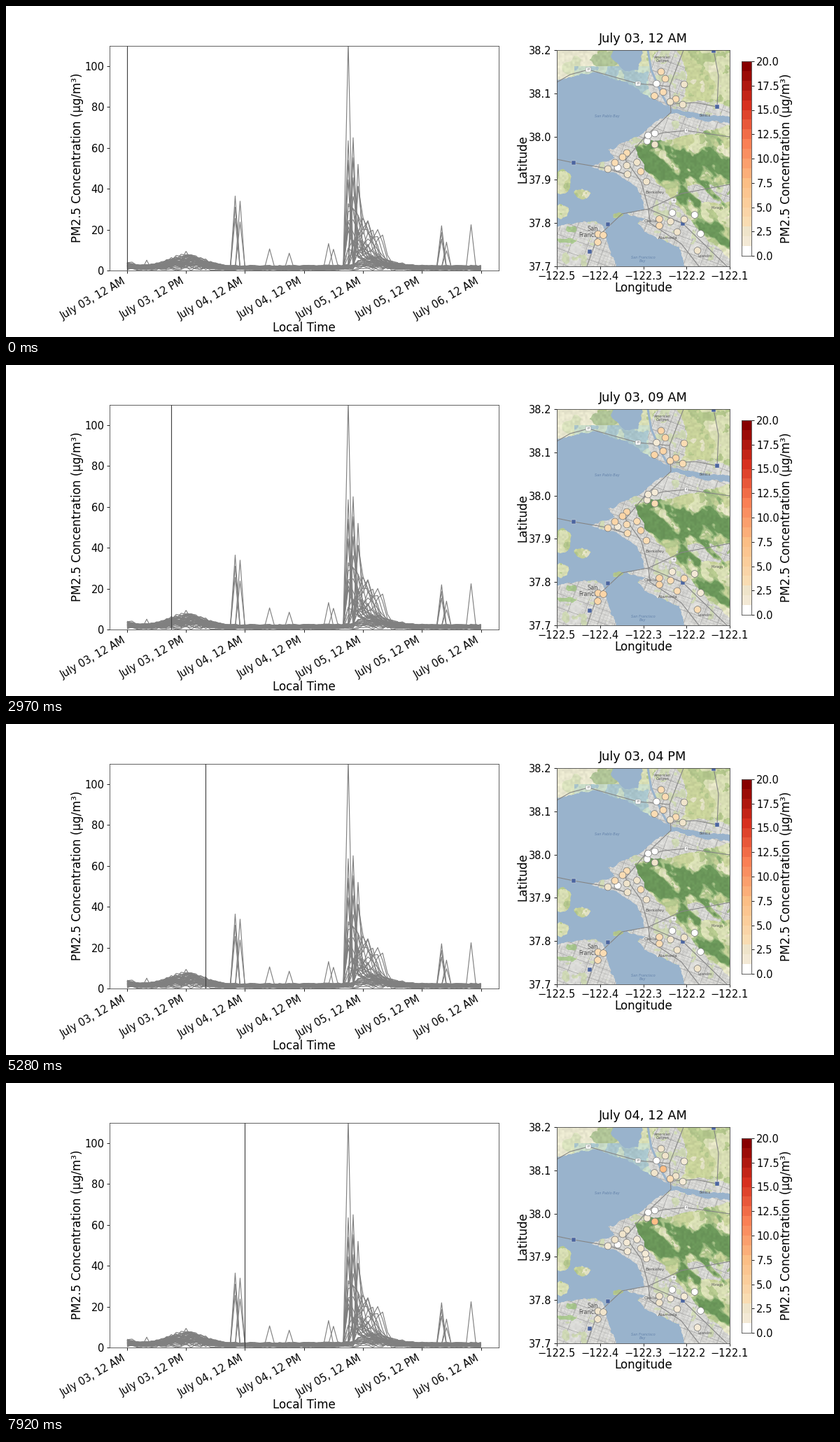
A matplotlib script that plays this animation: 1183 px wide and 473 px high, repeating every 8000 ms.

```python
import numpy as np
import matplotlib.pyplot as plt
from matplotlib.animation import FuncAnimation
from matplotlib.collections import LineCollection
from matplotlib.colors import LinearSegmentedColormap, to_rgb
from matplotlib.path import Path

W, H, DPI = 1183, 473, 64
PT = 72 / DPI                      # points per pixel
STEP, TICK, LOOP = 330, 40, 8000   # ms per hour, per drawn frame, per loop
TICK_SIZE, LABEL_SIZE, TITLE_SIZE = 14.6, 16.7, 17.8
UNIT = "PM2.5 Concentration (µg/m³)"

plt.rcParams.update({"font.family": "DejaVu Sans", "axes.linewidth": 0.85 * PT,
                     "axes.edgecolor": "#4a4a4a"})
fig = plt.figure(figsize=(W / DPI, H / DPI), dpi=DPI, facecolor="white")


def axes_px(x0, y0, x1, y1):
    ax = fig.add_axes([x0 / W, 1 - y1 / H, (x1 - x0) / W, (y1 - y0) / H])
    ax.tick_params(length=3.7 * PT, width=0.85 * PT, pad=3.6 * PT,
                   labelsize=TICK_SIZE * PT)
    return ax


def label(x, y, text, size=LABEL_SIZE, rotation=0):
    return fig.text(x / W, 1 - y / H, text, size=size * PT, rotation=rotation,
                    ha="center", va="center")


def clock(h):
    return f"July {3 + h // 24:02d}, {(h - 1) % 12 + 1:02d} {'PM' if h % 24 > 11 else 'AM'}"


# ---------- time series ----------
hours = np.arange(73)
# hour, height, number of lines that spike together
PEAKS = [(4, 5.2, 1), (12, 9.5, 2), (22, 36.5, 3), (23, 34, 2), (29, 10.7, 1),
         (33, 8.6, 1), (41, 13.3, 1), (42, 10.5, 1), (45, 112, 1), (45, 63.5, 3),
         (46, 65, 3), (47, 52, 1), (64, 22, 3), (65, 14, 2), (70, 22.5, 1)]


def bell(x, mid, width):
    return np.exp(-((x - mid) / width) ** 2)


def make_series(count=44):
    rng = np.random.default_rng(11)
    swell = 2.4 + 5.2 * bell(hours, 12, 5) + 1.7 * bell(hours, 0, 2) + 2.5 * bell(hours, 51, 5)
    fire = np.where(hours < 45, 0, np.exp(-((hours - 45) / 3.2) ** 1.6))
    lines = []
    for k in np.linspace(0, 1, count):
        y = swell * (0.72 * rng.random() + 0.45 * rng.random(73))
        gust = np.roll(fire, rng.integers(0, 3)) * rng.uniform(0.3, 1, 73)
        lines.append(y + 46 * k ** 2 * gust)
    for n, y in enumerate(lines[-6:]):
        late = rng.uniform(18, 29) * bell(hours, 49 + 0.5 * n, 1.7)
        np.maximum(y, late * rng.uniform(0.8, 1, 73), out=y)
    spare = iter(lines)
    for hour, height, lift in PEAKS:
        for share in np.linspace(1, 0.7, lift):
            next(spare)[hour] = height * share
    return lines


left = axes_px(147.7, 56.5, 703.8, 378.4)
left.set(xlim=(-3.6, 75.6), ylim=(0, 110), xticks=range(0, 73, 12),
         yticks=range(0, 101, 20))
left.set_xticklabels([clock(h) for h in range(0, 73, 12)], rotation=30, ha="right")
left.add_collection(LineCollection([np.column_stack([hours, y]) for y in make_series()],
                                   colors="#808080", linewidths=1.15 * PT))
cursor = left.axvline(0, color="#404040", lw=1.15 * PT, zorder=3)
label(426, 460, "Local Time")
label(102, 217, UNIT, rotation=90)

# ---------- terrain map, in stage pixels ----------
X0, Y0, X1, Y1 = 787, 63, 1034, 372
SS = 2
gx, gy = np.meshgrid(np.arange(X0, X1, 1 / SS) + 0.25, np.arange(Y0, Y1, 1 / SS) + 0.25)
dx, dy = gx - X0, gy - Y0


def noise(cell, seed, u=dx, v=dy):
    grid = np.random.default_rng(seed).random((128, 128))
    u, v = u / cell, v / cell
    i, j = np.floor(u).astype(int), np.floor(v).astype(int)
    fu, fv = u - i, v - j
    fu, fv = fu * fu * (3 - 2 * fu), fv * fv * (3 - 2 * fv)

    def row(j):
        return grid[j % 128, i % 128] * (1 - fu) + grid[j % 128, (i + 1) % 128] * fu

    return row(j) * (1 - fv) + row(j + 1) * fv


def fractal(cell, seed, *uv):
    return sum(noise(cell / 2 ** k, seed + k, *uv) / 2 ** k for k in range(3)) / 1.75


wx, wy = gx + 7 * (fractal(9, 1) - 0.5), gy + 7 * (fractal(9, 5) - 0.5)
warped = np.column_stack([wx.ravel(), wy.ravel()])


def area(poly):
    return Path(poly).contains_points(warped).reshape(gx.shape)


def blob(x, y, rx, ry):
    return ((wx - x) / rx) ** 2 + ((wy - y) / ry) ** 2 < 1


NORTH = [(770, 50), (866, 50), (866, 76), (884, 93), (902, 92), (914, 50), (1050, 50),
         (1050, 160), (990, 155), (950, 146), (922, 131), (888, 111), (845, 95),
         (822, 98), (770, 112)]
EAST = [(1050, 170), (990, 163), (952, 152), (918, 173), (903, 186), (861, 206),
        (868, 216), (836, 231), (874, 240), (903, 260), (913, 290), (882, 297),
        (912, 302), (902, 309), (914, 322), (962, 345), (974, 390), (1050, 390)]
CITY_WEST = [(770, 316), (843, 306), (855, 314), (862, 348), (878, 390), (770, 390)]


def paint_map():
    img = np.empty(gx.shape + (3,))
    img[:] = to_rgb("#99b3cc")

    def fill(mask, color):
        img[mask] = to_rgb(color)

    north, east, west = area(NORTH), area(EAST), area(CITY_WEST)
    isles = (blob(795, 252, 12, 18) | blob(823, 269, 11, 7) | blob(793, 293, 10, 10)
             | blob(875, 300, 6, 4))
    land = north | east | west | isles
    rough, fine = fractal(26, 20), fractal(13, 30)
    ridge = fractal(12, 40, (dx + dy) * 0.4, (dy - dx) * 0.7)
    fill(land, "#d8deb4")
    fill(land & (rough > 0.55), "#c9d39b")
    fill(land & (fine > 0.62), "#b4c78d")
    fill(land & (fine < 0.33), "#e5e4c6")

    flats = north & (gx < 845)
    fill(flats, "#e9e7cf")
    fill(flats & (rough > 0.56), "#d9e1bd")
    fill(north & blob(856, 76, 20, 12), "#b0c497")
    marsh = north & (gx < 932) & (gx > 812) & (gy > 86)
    fill(marsh, "#c9dcc8")
    fill(marsh & (fine > 0.52), "#a9c5cc")

    hill_x = np.interp(wy, [165, 188, 198, 230, 275, 330, 368], [1060, 960, 896, 912, 950, 1000, 1040])
    hills = east & (wx > hill_x)
    towns = (east & ~hills) | west | (land & (
        blob(945, 105, 27, 48) | blob(990, 150, 50, 14) | blob(1005, 268, 48, 14)))
    fill(towns, "#dadad7")
    a, b = gx * 0.94 + gy * 0.34, gy * 0.94 - gx * 0.34
    fill(towns & ((a % 5 < 0.8) | (b % 4 < 0.7)) & (rough > 0.36), "#c6c6c4")
    fill(towns & ((a % 23 < 0.9) | (b % 19 < 0.9)), "#acacab")
    fill(towns & (fine > 0.7), "#cdd7b4")

    # woods follow two ridges running down to the right
    woods = ridge + 0.26 * np.maximum(bell(gy, 226 + 0.2 * (gx - 960), 32),
                                      bell(gy, 285 + 0.75 * (gx - 960), 17))
    fill(hills & (woods > 0.64), "#a6c086")
    fill(hills & (woods > 0.70), "#86ab70")
    fill(hills & (woods > 0.74), "#6b975a")
    fill(west & (blob(800, 335, 15, 3) | blob(808, 318, 7, 4)), "#a9c78f")
    img[land] *= (0.95 + 0.1 * noise(3, 50))[land][:, None]
    h, w = gx.shape
    return np.clip(img, 0, 1).reshape(h // SS, SS, w // SS, SS, 3).mean((1, 3))


chart = axes_px(X0, Y0, X1, Y1)
chart.imshow(paint_map(), extent=(X0, X1, Y1, Y0), interpolation="nearest", aspect="auto")
chart.set(xlim=(X0, X1), ylim=(Y1, Y0))
chart.set_xticks(np.linspace(X0, X1, 5), [f"−{122.5 - k / 10:.1f}" for k in range(5)])
chart.set_yticks(np.linspace(Y1, Y0, 6), [f"{37.7 + k / 10:.1f}" for k in range(6)])

CHANNEL = [(917, 63), (922, 92), (939, 130), (948, 146)]
HIGHWAYS = [
    [(968, 63), (948, 115), (950, 152), (912, 188), (885, 220), (908, 252), (918, 290),
     (880, 297), (845, 330), (830, 372)],
    [(787, 219), (811, 224), (858, 232), (890, 242)],
    [(787, 109), (806, 98), (832, 91), (903, 111), (948, 115)],
    [(951, 140), (985, 138), (1016, 144), (1018, 100), (1011, 63)],
    [(912, 188), (940, 181), (972, 178), (1034, 187)],
    [(918, 290), (965, 268), (1034, 255)],
    [(918, 290), (920, 310), (965, 340), (990, 372)],
    [(918, 290), (967, 311), (1030, 372)]]
chart.add_collection(LineCollection([CHANNEL], colors="#99b3cc", linewidths=3 * PT))
chart.add_collection(LineCollection(HIGHWAYS, colors="#858585", linewidths=1.1 * PT))


def place(x, y, text, size=5, color="#555555", **kw):
    chart.text(x, y, text, size=size * PT, color=color, ha="center", va="center",
               linespacing=1.05, clip_on=True, **kw)


for args in [(938, 76, "American\nCanyon"), (927, 267, "Berkeley", 6.2),
             (925, 308, "Oakland", 6.2), (946, 331.5, "Alameda", 6.2),
             (838, 323, "San\nFrancisco", 8.2), (999, 358, "Leandro"),
             (999, 156, "Benicia", 4.5), (1016, 289, "Moraga", 4.5)]:
    place(*args)
place(859, 157, "San Pablo Bay", 5, "#6483ab", style="italic")
place(910, 362, "San Francisco\nBay", 5, "#6483ab", style="italic")
for x, y in [(1011, 64), (1016, 144), (811, 224), (860, 312), (967, 311), (834, 351)]:
    chart.plot(x, y, "s", ms=6.5 * PT, mfc="#4a64a0", mec="#dddddd", mew=0.5)
for x, y, n in [(832, 91, "37"), (903, 111, "37"), (972, 178, "4"), (954, 278, "24")]:
    place(x, y, n, 4.2, bbox=dict(boxstyle="round,pad=0.25", fc="white", ec="#999999", lw=0.5))

# ---------- stations, grouped by how smoky they usually are ----------
CLEAN = [(929.5, 111), (927, 182), (916, 193), (917.5, 185), (874, 231), (952, 295.5),
         (984, 298.5), (992.5, 325.5)]
SMOKY = [(936, 94), (942, 104), (939, 123), (926.5, 128.5), (957, 133), (887, 210),
         (881, 216), (870, 224), (907, 236.5), (933.5, 304.5), (933.5, 314), (846, 326),
         (853.5, 327.5), (845.5, 337.5)]
MILD = [(969, 112), (949, 137), (967, 141), (927, 198), (860, 233), (887, 228),
        (901.5, 223.5), (888, 240.5), (915, 251), (949.5, 308), (969, 305), (959, 323),
        (988, 349.5), (913.5, 244)]
spots = np.array(CLEAN + SMOKY + MILD)
usual = np.repeat([0.75, 3.3, 2.4], [len(CLEAN), len(SMOKY), len(MILD)])
# x, y, hour, strength of passing smoke
PLUMES = [(876, 220, 21, 16), (943, 128, 24, 9), (927, 198, 24, 5.5), (933, 316, 12, 4),
          (984, 299, 12, 5)]


def levels(h):
    v = usual * np.interp(h, [0, 3, 7, 12, 16, 21, 24], [1, .6, 1.15, 1.7, 1.05, .75, .7])
    for x, y, hour, strength in PLUMES:
        near = bell(np.hypot(*(spots - (x, y)).T), 0, 9)
        v += strength * near * max(0, 1 - abs(h - hour) / 2)
    return v


ramp = [(0, "#ffffff"), (.05, "#f4ead6"), (.1, "#efe5cd"), (.16, "#fadcb2"),
        (.37, "#fdbe85"), (.58, "#fa8055"), (.79, "#d7301f"), (1, "#870000")]
cmap = LinearSegmentedColormap.from_list("smoke", ramp, N=20)
dots = chart.scatter(*spots.T, c=levels(0), cmap=cmap, vmin=0, vmax=20,
                     s=(9.8 * PT) ** 2, edgecolors="#777777", linewidths=0.7 * PT, zorder=5)
title = label(910, 46.5, clock(0), TITLE_SIZE)
label(910.5, 402.7, "Longitude")
label(738.3, 218.5, "Latitude", rotation=90)

bar = axes_px(1051, 79, 1065, 357)
bar.imshow(np.arange(20)[:, None], cmap=cmap, extent=(0, 1, 0, 20), origin="lower",
           aspect="auto", interpolation="nearest")
bar.yaxis.tick_right()
bar.set_xticks([])
bar.set_yticks(np.arange(0, 20.1, 2.5), [f"{v:.1f}" for v in np.arange(0, 20.1, 2.5)])
label(1115, 217.5, UNIT, rotation=90)


def update(i):
    h = (i * TICK + 30) // STEP
    cursor.set_xdata([h, h])
    title.set_text(clock(h))
    shown = len(spots) - (h <= 17)   # the last station reports only from evening
    dots.set_offsets(spots[:shown])
    dots.set_array(levels(h)[:shown])
    return cursor, title, dots


anim = FuncAnimation(fig, update, frames=LOOP // TICK, interval=TICK, repeat=True)
plt.show()
```
